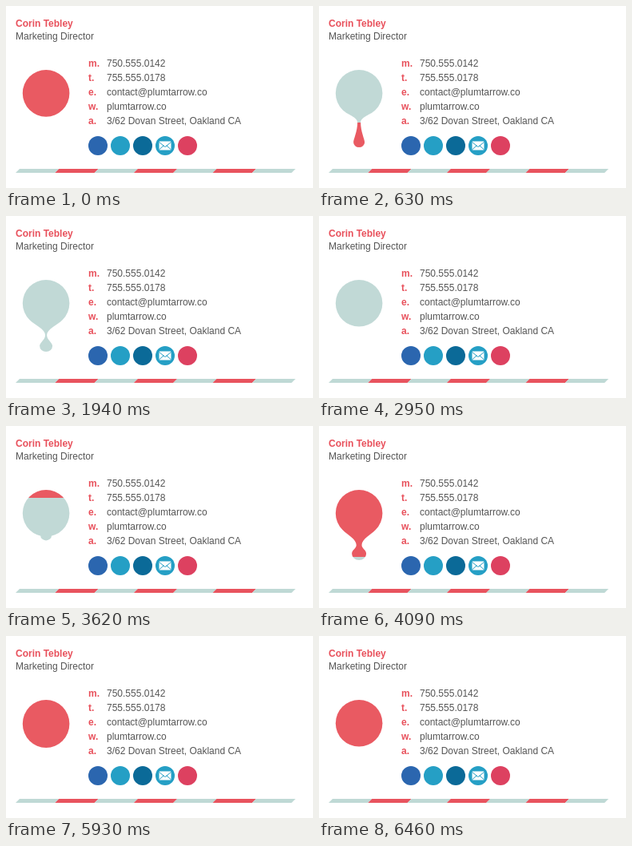
An HTML page for the animation above (6500 ms loop, 384 px wide and 228 px high).

```html
<!DOCTYPE html>
<html lang="en">
<head>
<meta charset="utf-8">
<title>Email signature</title>
<style>
  html, body { margin: 0; width: 100%; height: 100%; overflow: hidden; background: #fff; }
  svg { display: block; width: 384px; height: 228px; }
  span { position: absolute; white-space: nowrap; font: 12px/18px "Liberation Sans", Arial, sans-serif; color: #555; }
  .accent { font-weight: bold; color: #e8505b; }
</style>
</head>
<body>
<svg viewBox="0 0 384 228">
  <defs>
    <linearGradient id="wash" gradientUnits="userSpaceOnUse" x1="0" y1="0" x2="0" y2="228">
      <stop class="edge fresh"/>
      <stop class="edge stale"/>
    </linearGradient>
    <clipPath id="frame"><rect x="18" y="65" width="66" height="120"/></clipPath>
  </defs>
  <g id="badges"></g>
  <g fill="none" stroke="#259fc5">
    <rect x="191.5" y="169.5" width="15" height="11" rx="1" fill="#fff" stroke="none"/>
    <path d="M191.5 170.5L199 176.5L206.5 170.5M191.5 180L197 175M206.5 180L201 175"/>
  </g>
  <g id="stripes"></g>
  <path id="blob" fill="url(#wash)" clip-path="url(#frame)"/>
</svg>
<script>
const RED = '#e95a62', TEAL = '#c1d9d6';
const LOOP = 6500, TO_TEAL = 320, TO_RED = 3540, DETACH = 2080;
const CX = 50.1, CY = 109.3, R = 29.3;
const $ = id => document.getElementById(id);

function addShape(parent, tag, attrs) {
  const node = document.createElementNS('http://www.w3.org/2000/svg', tag);
  for (const key in attrs) node.setAttribute(key, attrs[key]);
  $(parent).append(node);
}

function addText(x, top, content, className = '') {
  const node = document.createElement('span');
  node.className = className;
  node.style.left = x + 'px';
  node.style.top = top + 'px';
  node.textContent = content;
  document.body.append(node);
}

addText(12, 13, 'Corin Tebley', 'accent');
addText(12, 29, 'Marketing Director');
[['m.', '750.555.0142'], ['t.', '755.555.0178'], ['e.', 'contact@plumtarrow.co'],
 ['w.', 'plumtarrow.co'], ['a.', '3/62 Dovan Street, Oakland CA']].forEach(([label, value], i) => {
  addText(103, 63 + 18 * i, label, 'accent');
  addText(126, 63 + 18 * i, value);
});

['#2b66af', '#259fc5', '#0b6a98', '#259fc5', '#dd4160'].forEach((fill, i) =>
  addShape('badges', 'circle', { cx: 115 + 28 * i, cy: 175, r: 12, fill }));

for (let i = 0; i < 7; i++) {
  const x = 12 + 49.3 * i;
  addShape('stripes', 'path', { d: `M${x} 209l5-5h49.3l-5 5z`, fill: i % 2 ? '#e8535e' : '#bfd9d5' });
}

// time, neck y, neck half-width, drop bottom, drop half-width
const KEYS = [
  [0, 130, 6, 136, 6],
  [170, 139, 6, 152, 8],
  [310, 146, 2, 177, 7],
  [370, 147, 2.2, 178.5, 7],
  [550, 149, 3.4, 168, 9],
  [740, 148, 2.5, 173, 8],
  [930, 148, 2.5, 169, 8.8],
  [1150, 148, 2, 170, 8.3],
  [1620, 149, 1, 170, 8],
  [1800, 149, 1.3, 170, 8],
  [DETACH, 149, 0.4, 171, 8]
];

const clamp = v => Math.min(1, Math.max(0, v));
const ease = v => v * v * (3 - 2 * v);

function pose(p) {
  const i = Math.max(1, KEYS.findIndex(k => k[0] >= p));
  const a = KEYS[i - 1], b = KEYS[i];
  const u = ease(clamp((p - a[0]) / (b[0] - a[0])));
  return a.slice(1).map((v, j) => v + (b[j + 1] - v) * u);
}

function circle(ry) {
  const top = CY - R;
  return `M${CX} ${top}a${R} ${ry} 0 1 1 0 ${2 * ry}a${R} ${ry} 0 1 1 0 ${-2 * ry}z`;
}

function neck(tip, n) {
  const s = R * Math.SQRT1_2, y = CY + s;
  return `M${CX + s} ${y}C${CX + s - 6.5} ${y + 6.5} ${CX + n} ${tip - 7} ${CX + n} ${tip}` +
    `H${CX - n}C${CX - n} ${tip - 7} ${CX - s + 6.5} ${y + 6.5} ${CX - s} ${y}z`;
}

function drop(tip, n, bottom, rx) {
  const ry = rx * 0.9, cy = bottom - ry, c1 = tip + (cy - tip) * 0.45, c2 = cy - ry * 0.6;
  return `M${CX + n} ${tip}C${CX + n} ${c1} ${CX + rx} ${c2} ${CX + rx} ${cy}` +
    `A${rx} ${ry} 0 0 1 ${CX - rx} ${cy}C${CX - rx} ${c2} ${CX - n} ${c1} ${CX - n} ${tip}z`;
}

function blobPath(p) {
  if (p <= DETACH) {
    const [tip, n, bottom, rx] = pose(p);
    return circle(R) + neck(tip, n) + drop(tip, n, bottom, rx);
  }
  const q = p - DETACH;
  const fall = 40 * (q / 300) ** 2;
  const wobble = q > 240 ? 0.9 * Math.sin((q - 240) / 50) * Math.exp((240 - q) / 260) : 0;
  let d = circle(R + wobble);
  if (q < 240) d += neck(149 - 13 * ease(q / 240), 0.4);
  if (fall < 40) d += drop(149 + fall, 0.4, 171 + fall, 8);
  return d;
}

function draw(now) {
  const t = now % LOOP;
  const toTeal = t >= TO_TEAL && t < TO_RED;
  const p = toTeal ? t - TO_TEAL : (t - TO_RED + LOOP) % LOOP;
  // The new colour runs down the circle, then slowly fills the drop.
  const level = p < 310 ? 79 + 67 * ease(p / 310) : 146 + (p - 310) * 0.075;
  document.querySelectorAll('.edge').forEach(stop => {
    stop.setAttribute('offset', clamp(level / 228));
    stop.setAttribute('stop-color', stop.classList.contains('fresh') === toTeal ? TEAL : RED);
  });
  $('blob').setAttribute('d', blobPath(p));
}

const start = performance.now();
function tick() {
  draw(performance.now() - start);
  requestAnimationFrame(tick);
}
tick();
</script>
</body>
</html>
```
